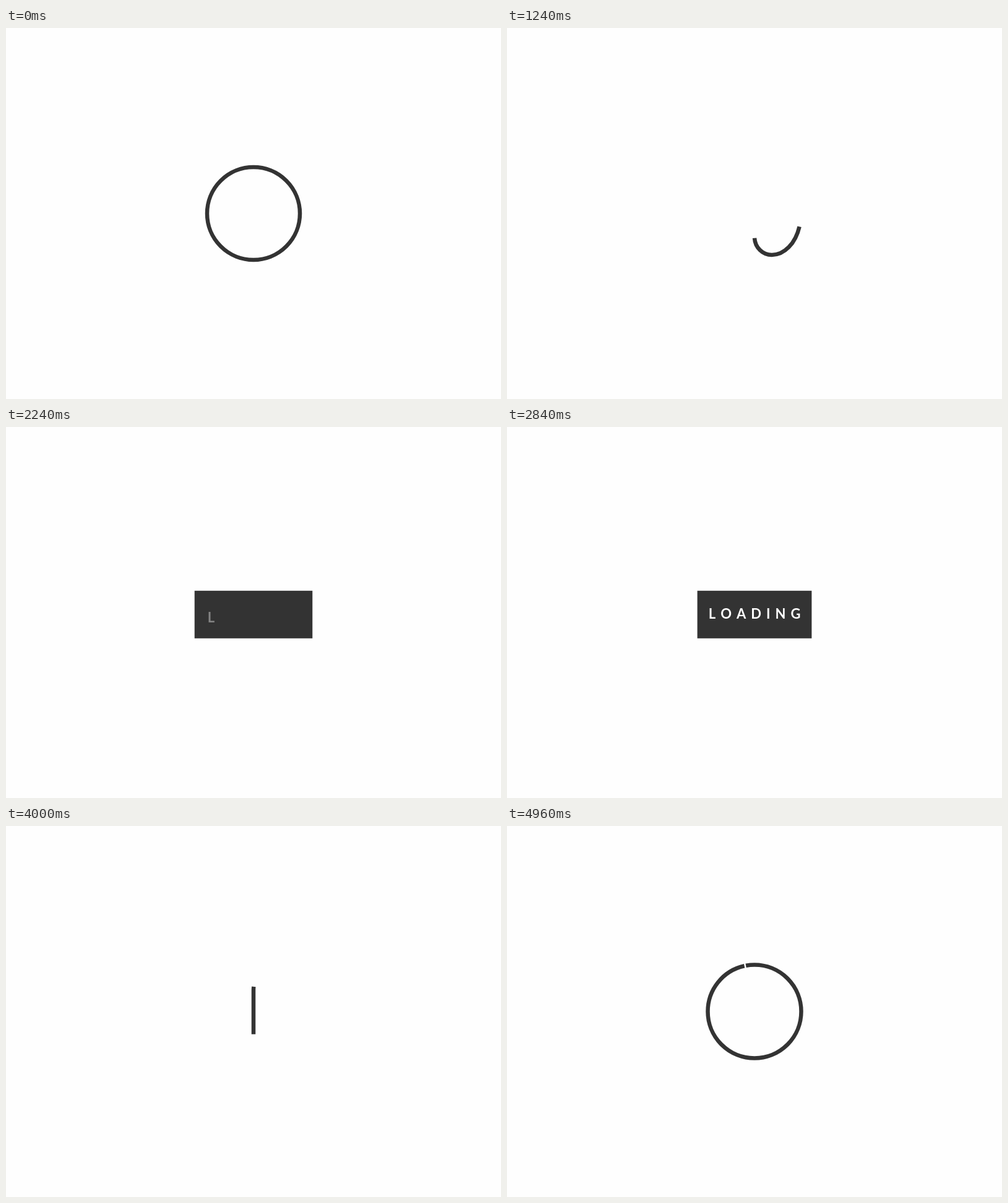
These frames come from a looping animation (800 by 600 pixels, 5 s). An HTML page with a canvas:

```html
<!DOCTYPE html>
<html lang="en">
<head>
<meta charset="utf-8">
<title>Loading</title>
<style>
  html, body { margin: 0; width: 100%; height: 100%; overflow: hidden; background: #fefefe; }
  canvas { display: block; }
</style>
</head>
<body>
<canvas id="stage" width="800" height="600"></canvas>
<script>
const ctx = document.getElementById('stage').getContext('2d');
const LOOP = 5000, STEP = 40;
const INK = '#333333', PAPER = '#fefefe';
const CX = 400, CY = 300, STROKE = 6.5;
const TOP = 264.8, BAR = 77;
const WORD = 'LOADING', SPACING = 8, BASELINE = 310.4;
const PI = Math.PI, rad = deg => deg * PI / 180;
const clamp = x => Math.max(0, Math.min(1, x));
const mix = (a, b, k) => a + (b - a) * k;
const span = (t, from, to) => clamp((t - from) / (to - from));

// Timing curve with flat ends; a and b set how long it eases out and in
function ease(x, a = 0.33, b = 0.67) {
  if (x <= 0 || x >= 1) return clamp(x);
  let lo = 0, hi = 1, u = 0.5;
  for (let i = 0; i < 30; i++) {
    u = (lo + hi) / 2;
    const w = 1 - u;
    if (3 * w * w * u * a + 3 * w * u * u * b + u * u * u < x) lo = u; else hi = u;
  }
  return u * u * (3 - 2 * u);
}

// Clockwise turns, added in pieces so several revolutions keep their length
function addTurns(path, r, from, to) {
  for (let a = from; a < to; a += PI / 2) {
    path.arc(CX, CY, r, a, Math.min(to, a + PI / 2));
  }
}

// Circle, then a hook up into the vertical bar
const R_IN = 75;
const inStart = rad(-101);
const pathIn = new Path2D();
addTurns(pathIn, R_IN, inStart, 4 * PI);
pathIn.ellipse(428, CY, 47, 67, 0, 0, PI / 2);
pathIn.ellipse(428, 338, 28, 29, 0, PI / 2, PI);
pathIn.lineTo(CX, TOP - 5);
const inEnd = (4 * PI - inStart) * R_IN + 135 + 338 - TOP;

// Vertical bar, over the top and back round the circle
const R_OUT = 75.5;
const outEnd = rad(720 - 100.3);
const pathOut = new Path2D();
pathOut.moveTo(CX, TOP + BAR);
pathOut.lineTo(CX, 265);
pathOut.ellipse(428, 265, 28, 32, 0, PI, 1.5 * PI);
pathOut.ellipse(428, CY, 47.5, 67, 0, -PI / 2, 0);
addTurns(pathOut, R_OUT, 0, outEnd + 0.1);
const outTravel = 138 + outEnd * R_OUT;

function trim(path, tail, head) {
  ctx.setLineDash([head - tail, 9999]);
  ctx.lineDashOffset = -tail;
  ctx.stroke(path);
  ctx.setLineDash([]);
}

function drawRing() {
  ctx.beginPath();
  ctx.arc(CX, CY, R_IN, 0, 2 * PI);
  ctx.stroke();
}

function drawEntry(t) {
  const x = span(t, 100, 1780);
  const tail = mix(0, inEnd - BAR, ease(x, 0.32, 0.31));
  const head = mix(2 * PI * R_IN, inEnd, ease(x, 0.53, 0.27));
  trim(pathIn, tail, head);
}

function drawExit(t) {
  const head = BAR + outTravel * ease(span(t, 3960, 5000), 0.3, 0.7);
  const length = mix(BAR, 2 * PI * R_OUT, ease(span(t, 4430, 4990)));
  trim(pathOut, head - length, head);
}

function boxWidth(t) {
  if (t < 2215) return mix(STROKE, 191.5, ease(span(t, 1810, 2215)));
  if (t < 3680) return mix(191.5, 184.8, ease(span(t, 2215, 2320)));
  return mix(184.8, STROKE, ease(span(t, 3680, 3960)));
}

function drawWord(t) {
  ctx.font = 'bold 22px Lato, sans-serif';
  ctx.fillStyle = '#ffffff';
  const sizes = [...WORD].map(c => ctx.measureText(c));
  const full = sizes.reduce((sum, m) => sum + m.width + SPACING, -SPACING);
  const first = sizes[0], last = sizes[sizes.length - 1];
  const padL = -first.actualBoundingBoxLeft;
  const padR = last.width - last.actualBoundingBoxRight;
  let x = CX + 0.2 - (full + padL - padR) / 2;
  const fade = 1 - span(t, 3700, 3880);
  [...WORD].forEach((c, i) => {
    const k = span(t, 2192 + i * 68, 2432 + i * 68);
    ctx.globalAlpha = Math.min(1, 2 * k) * fade;
    ctx.fillText(c, x, BASELINE + 6.5 * (1 - ease(k)));
    x += sizes[i].width + SPACING;
  });
}

function drawBox(t) {
  const w = boxWidth(t);
  ctx.save();
  ctx.fillStyle = INK;
  ctx.fillRect(CX - w / 2, TOP, w, BAR);
  ctx.beginPath();
  ctx.rect(CX - w / 2, TOP, w, BAR);
  ctx.clip();
  drawWord(t);
  ctx.restore();
}

function draw(t) {
  ctx.fillStyle = PAPER;
  ctx.fillRect(0, 0, 800, 600);
  ctx.strokeStyle = INK;
  ctx.lineWidth = STROKE;
  if (t < 120) drawRing();
  else if (t < 1800) drawEntry(t);
  else if (t < 3960) drawBox(t);
  else drawExit(t);
}

const begin = performance.now();
function tick() {
  const t = (performance.now() - begin) % LOOP;
  draw(Math.floor(t / STEP) * STEP);
  requestAnimationFrame(tick);
}
tick();
</script>
</body>
</html>
```
